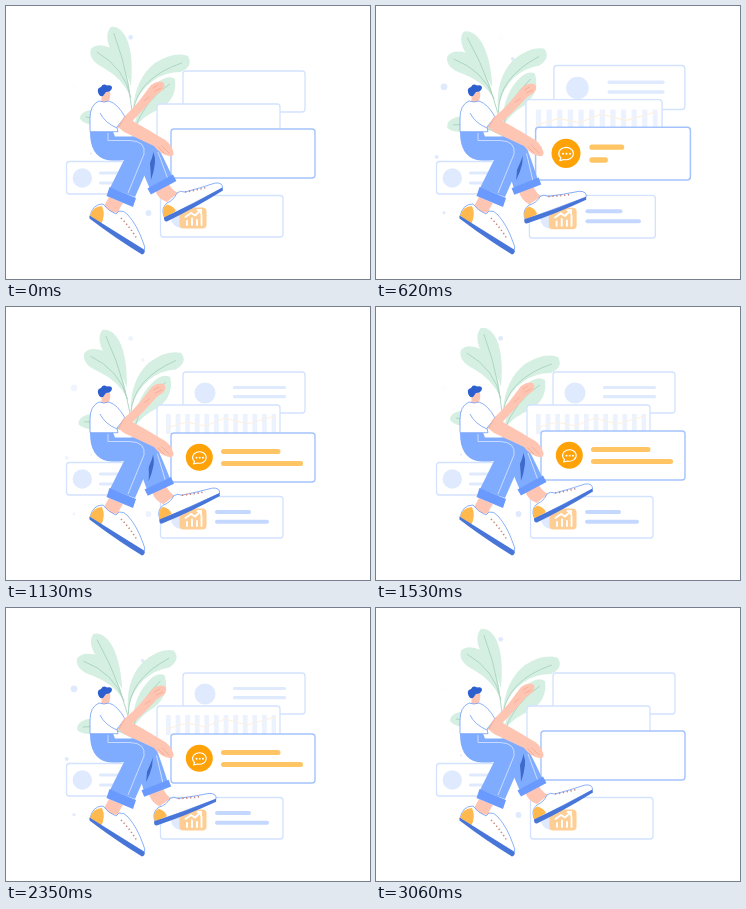
Animation of 364x273 px, one loop 3.17 s. Source, as an HTML page:

```html
<!DOCTYPE html>
<html lang="en">
<head>
<meta charset="utf-8">
<title>Floating cards</title>
<style>
html, body { margin: 0; width: 100%; height: 100%; overflow: hidden; background: #fff; }
svg { display: block; width: 100vw; height: 100vh; }
.card { fill: #fff; stroke: #d3e2ff; stroke-width: 1.3; }
.main { stroke: #a4c3fd; stroke-width: 1.4; }
.pale { fill: #dfeafe; }
.bar { fill: none; stroke: #dfeafe; stroke-width: 3.2; stroke-linecap: round; }
.mid { stroke: #c4d8ff; stroke-width: 4; }
.warm { stroke: #ffc564; stroke-width: 5; }
.leaf { fill: #d5f0e2; }
.vein { fill: none; stroke: #a4d0ba; stroke-width: .8; }
.skin { fill: #ffc5b3; }
.crease { fill: none; stroke: #f3a48f; stroke-width: .7; stroke-linecap: round; }
.pants { fill: #80acff; }
.cuff { fill: #6b9aff; }
.seam { fill: none; stroke: #dbe8ff; stroke-width: .8; }
.white { fill: #fff; stroke: #6f9df8; stroke-width: .8; stroke-linejoin: round; }
.sole { fill: #4876d8; }
.heel { fill: #ffb94f; }
.lace { fill: none; stroke: #c98377; stroke-width: 1.6; stroke-dasharray: 1.3 2.6; }
.icon { fill: none; stroke: #fff; stroke-width: 1.1; stroke-linecap: round; stroke-linejoin: round; }
.thick { stroke-width: 1.9; }
</style>
</head>
<body>
<svg viewBox="0 0 364 273">
  <g id="dotsA" class="pale">
    <circle cx="124.7" cy="31.3" r="2.4"/><circle cx="142.5" cy="207" r="2.9"/><circle cx="85" cy="147.5" r="1"/>
  </g>
  <g id="dotsB" class="pale">
    <circle cx="136.7" cy="52.8" r="1.9"/><circle cx="68" cy="80.8" r="3.4"/>
    <circle cx="60.7" cy="151" r="2"/><circle cx="68" cy="206.8" r="1.6"/>
  </g>

  <rect class="card" x="60.5" y="155.5" width="64" height="32.5" rx="3"/>
  <circle class="pale" cx="76.3" cy="172" r="9.7"/>
  <path class="bar" d="M94.5 167H120M94.5 177H116"/>

  <g id="plant">
    <path class="leaf" d="M125 80Q128 50 121 33Q114 19 105 21Q97 30 107 48Q120 63 125 80Z"/>
    <path class="leaf" d="M124 90Q123 59 105 42Q91 36 85 43Q82 54 98 62Q117 73 124 90Z"/>
    <path class="leaf" d="M127 104Q129 73 149 57Q168 45 182 50Q188 60 175 66Q160 66 148 74Q133 84 127 104Z"/>
    <path class="leaf" d="M128 122Q133 92 150 78Q161 68 169 73Q172 92 154 103Q138 109 128 122Z"/>
    <path class="leaf" d="M128 128Q105 103 84 104Q74 106 74 113Q80 121 101 119Q120 121 128 128Z"/>
    <path class="vein" d="M128 135Q127 78 108 27M125 92Q119 62 91 46M127 106Q132 72 176 57M128 124Q139 94 164 78M128 130Q106 112 80 111"/>
  </g>

  <g id="card1">
    <rect class="card" x="177" y="65" width="122" height="41" rx="3"/>
    <circle class="pale pop" cx="199" cy="86" r="10.5"/>
    <path class="bar" data-from="240" data-to="520" pathLength="1" d="M228.5 80.5H278.5"/>
    <path class="bar" data-from="280" data-to="560" pathLength="1" d="M228.5 89.7H278.5"/>
  </g>
  <g id="card2">
    <rect class="card" x="151" y="98" width="123" height="42" rx="3"/>
    <g id="chart">
      <path d="M160 117H270" stroke="#edf3fe" stroke-width="20" stroke-dasharray="4.8 4.8"/>
      <path d="M160 121L181 115L199 119L219 111L241 117L269 109" fill="none" stroke="#fdf0e0"/>
    </g>
  </g>
  <g id="card4">
    <rect class="card" x="154.5" y="189.5" width="122.5" height="41.5" rx="3"/>
    <circle class="pale" cx="175" cy="212" r="10"/>
    <rect x="173.5" y="201.5" width="27" height="21" rx="4" fill="#ffca8b" fill-opacity=".92"/>
    <path class="icon thick" d="M181 219V215M186 219V212.5M191 219V214M195.5 219V209M179.5 211L185 207L189 209.5L195 204M191.5 204H195V207.5"/>
    <path class="bar mid" data-from="200" data-to="460" pathLength="1" d="M211 205H243"/>
    <path class="bar mid" data-from="240" data-to="520" pathLength="1" d="M211 214.7H261"/>
  </g>
  <g id="card3">
    <rect class="card main" x="165" y="123" width="144" height="49" rx="3"/>
    <g id="chat">
      <circle cx="193.3" cy="147.3" r="13.5" fill="#ffa208"/>
      <path class="icon" d="M188.5 151.5A6.8 5.7 0 1 1 191.5 153L187.5 154Z"/>
      <path class="icon thick" d="M190.5 147.700h.1M193.700 147.700h.1M196.900 147.700h.1"/>
    </g>
    <path class="bar warm" data-from="420" data-to="800" pathLength="1" d="M217.5 141.500H272"/>
    <path class="bar warm" data-from="520" data-to="880" pathLength="1" d="M217.5 153.500H294.500"/>
  </g>

  <g id="arm">
    <path class="skin" d="M112 116Q128 103 139 87L145 79Q151 74 157 76Q160 79 157 84L150 89Q138 104 121 120Z"/>
    <path class="crease" d="M147 82L152 79M149 85L155 82M138 95L143 91"/>
  </g>

  <g id="leg">
    <path class="skin" d="M149 184L163 178Q166 184 172 187L161 196Q152 193 149 184Z"/>
    <path class="white" d="M158 210Q155 202 161 197Q168 194 171 187Q174 184 179 186Q194 182 209 177Q217 176 216.500 182L159 212Z"/>
    <path class="heel" d="M158 210Q155.500 202 161 198.500Q168 200 170 205L159 212Z"/>
    <path class="lace" d="M179 186Q191 184 202 181"/>
    <path class="sole" d="M158 211.500Q188 198 216.500 181.500L217 184.500Q189 202 161 215.500Q158 216 158 211.500Z"/>
    <path class="pants" d="M130 130L149 136Q158 152 167 172L144 183L130 150Z"/>
    <path d="M141 136Q150 146 149 157Q148 166 145 174Q145 160 141 136Z" fill="#3e6bcb"/>
    <path class="seam" d="M152 146L162 173"/>
    <path class="cuff" d="M141.500 182.500L167 168.500L170.500 175L145 188.500Z"/>
  </g>

  <path class="skin" d="M103 191L117 197Q113 203 112 207Q103 207 98 200Z"/>
  <path class="white" d="M84 211Q86 198 97 198Q102 205 110 208L113 205Q118 204 122 209Q131 219 137 236Q140 241 138 246Z"/>
  <path class="heel" d="M84 210Q87 200 96 200Q100 209 95 218Z"/>
  <path class="lace" d="M115 212Q124 221 131 233"/>
  <path class="sole" d="M83.500 209.500L138 243.500Q140 247 136 248.500Q109 232 83.500 212.500Z"/>
  <path class="pants" d="M84 125.500H107L109 130.500H124Q141 129 147 138Q149 146 144 157L129 191L104 182L118 154Q110 155 101 154Q84 150 84 126Z"/>
  <path class="seam" d="M102 127V134.500H124Q140 135 138 148L122 187"/>
  <path class="cuff" d="M103.500 181L130 192L127 201L100.500 190Z"/>

  <path class="skin" d="M96 87L104 85Q105 92 102.500 95L102 99L95 98Z"/>
  <path fill="#2d5fcf" d="M92 86Q91 82 95 81Q97 77 101 79.500Q106 78.500 106 82Q105 86 100 86L97 90Q93 91 92 86Z"/>
  <path class="white" d="M93 95Q84 99 84 112V125.700H112L111 121L119 111Q112 98 103 95Q98 97 93 95Z"/>
  <path class="skin" d="M112 121L118 110.500Q138 121 154 131Q165 136 167.500 146Q168 151 163 150Q154 148 148 140L118 126Z"/>
  <path class="crease" d="M156 140L163 147M152 141L158 147M113 121L118 112"/>
  <path class="seam" style="stroke:#6f9df8" d="M94 107Q99 117 111 122"/>
</svg>
<script>
const LOOP = 3170, STEP = 101.8, SWAY = 1535, LIFE = 3030;
const $ = id => document.getElementById(id);
const set = (el, transform) => el.setAttribute('transform', transform);
const zoom = (k, x, y, ky = k) => `translate(${x} ${y}) scale(${k} ${ky}) translate(${-x} ${-y})`;
const ease = (t, a, b) => {
  const p = Math.min(1, Math.max(0, (t - a) / (b - a)));
  return p * p * (3 - 2 * p);
};
const swell = (t, start) => {
  const p = (t - start) / 600;
  return p > 0 && p < 1 ? 1 + .125 * Math.sin(Math.PI * p) ** 2 : 1;
};
const bars = [...document.querySelectorAll('[data-from]')];
const pop = document.querySelector('.pop');

function draw(t) {
  const sway = Math.cos(2 * Math.PI * (t + 50) / SWAY);
  const back = (1 - sway) / 2;
  set($('plant'), `rotate(${-9.5 * back} 128 135)`);
  set($('leg'), `rotate(${7.5 * back} 140 135)`);
  set($('arm'), `rotate(${3 * back} 113 115)`);
  $('dotsA').style.opacity = 1 - back;
  $('dotsB').style.opacity = back;

  // contents vanish at once when the cycle restarts
  const c = t < LIFE ? t : t - LIFE;
  const bob = c > 545 ? 1.5 - 1.5 * Math.cos(2 * Math.PI * (c - 545) / 1210) : 0;
  set($('card1'), zoom(swell(c, 178), 165, 139));
  set($('card2'), zoom(swell(c, 236), 161, 139));
  set($('card3'), `translate(0 ${bob}) ` + zoom(swell(c, 180), 237, 147.5));
  set($('card4'), zoom(swell(c, 106), 195, 195));
  set(pop, zoom(ease(c, 180, 420), 199, 86));
  set($('chat'), zoom(ease(c, 200, 460), 193.3, 147.3));
  set($('chart'), zoom(1, 160, 127, ease(c, 240, 540)));
  for (const b of bars) {
    const p = ease(c, +b.dataset.from, +b.dataset.to);
    b.style.visibility = p ? 'visible' : 'hidden';
    b.style.strokeDasharray = `${p} 2`;
  }
}

function tick() {
  const n = Math.floor(performance.now() % LOOP / STEP);
  draw(Math.min(n, 30) * STEP);
  requestAnimationFrame(tick);
}
tick();
</script>
</body>
</html>
```
